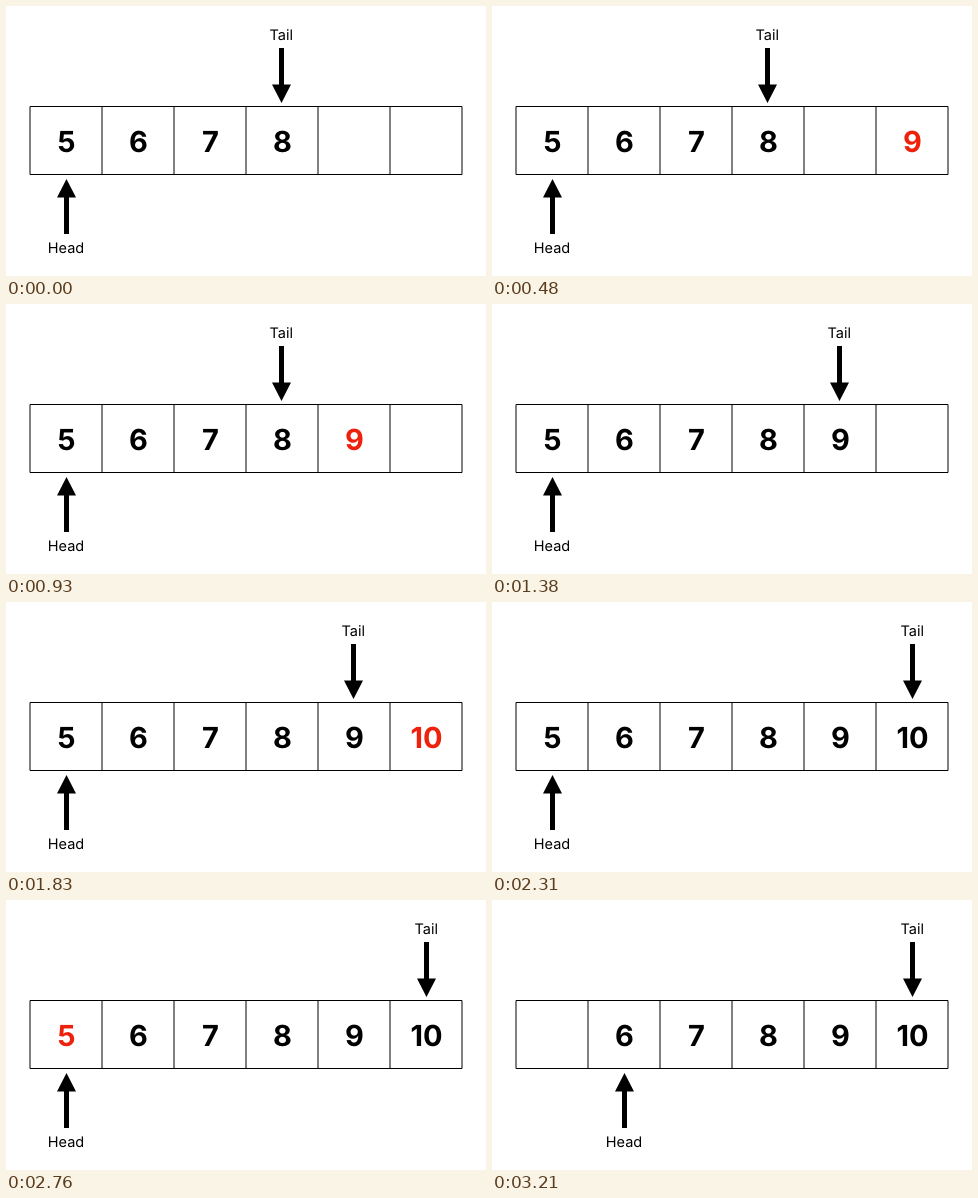
Write an HTML page that moves like this. It is 480x270 px and loops after 3690 ms.

```html
<!DOCTYPE html>
<html lang="en">
<head>
<meta charset="utf-8">
<title>Queue</title>
<style>
  html, body { margin: 0; width: 100%; height: 100%; overflow: hidden; background: #fff; }
  svg { display: block; width: 480px; height: 270px; }
  text { font-family: Inter, "Liberation Sans", sans-serif; text-anchor: middle; text-rendering: geometricPrecision; }
  .digit { font-size: 29px; font-weight: 700; }
  .label { font-size: 14.5px; }
  .grid { fill: none; stroke: #000; stroke-width: 1; }
</style>
</head>
<body>
<svg viewBox="0 0 480 270">
  <path class="grid" d="M24 100.5H456V168.5H24Z M96 100.5v68 M168 100.5v68 M240 100.5v68 M312 100.5v68 M384 100.5v68"/>
  <g id="cells"></g>
  <g id="tail">
    <text class="label" x="-0.3" y="34">Tail</text>
    <path d="M-2.5 42h5v36.5h7L0 97L-9.5 78.5h7Z"/>
  </g>
  <g id="head">
    <path d="M0 173L9.5 191.5h-7V228h-5V191.5h-7Z"/>
    <text class="label" x="-0.5" y="247">Head</text>
  </g>
</svg>
<script>
const LOOP = 3690;
const CELL = 72;
const RED = "#ee220c";
const TAIL_X = { 3: 275.5, 4: 347.5, 5: 420.5 };

// "!" marks a highlighted value
const steps = [
  { at: 0,    cells: "5 6 7 8 _ _",    head: 0, tail: 3 },
  { at: 480,  cells: "5 6 7 8 _ 9!",   head: 0, tail: 3 },
  { at: 930,  cells: "5 6 7 8 9! _",   head: 0, tail: 3 },
  { at: 1380, cells: "5 6 7 8 9 _",    head: 0, tail: 4 },
  { at: 1830, cells: "5 6 7 8 9 10!",  head: 0, tail: 4 },
  { at: 2310, cells: "5 6 7 8 9 10",   head: 0, tail: 5 },
  { at: 2760, cells: "5! 6 7 8 9 10",  head: 0, tail: 5 },
  { at: 3210, cells: "_ 6 7 8 9 10",   head: 1, tail: 5 }
];

const byId = id => document.getElementById(id);
const cellX = i => 60.5 + i * CELL;
const moveTo = (id, x) => byId(id).setAttribute("transform", `translate(${x} 0)`);

const digits = Array.from({ length: 6 }, (_, i) => {
  const text = document.createElementNS("http://www.w3.org/2000/svg", "text");
  text.setAttribute("class", "digit");
  text.setAttribute("x", cellX(i));
  text.setAttribute("y", 145.5);
  return byId("cells").appendChild(text);
});

function show(step) {
  step.cells.split(" ").forEach((value, i) => {
    digits[i].textContent = value.replace(/[_!]/g, "");
    digits[i].setAttribute("fill", value.endsWith("!") ? RED : "#000");
  });
  moveTo("head", cellX(step.head));
  moveTo("tail", TAIL_X[step.tail]);
}

let current = steps[0];
show(current);

const start = performance.now();
function tick() {
  const time = (performance.now() - start) % LOOP;
  const step = steps.filter(s => s.at <= time).pop();
  if (step !== current) show(current = step);
  requestAnimationFrame(tick);
}
requestAnimationFrame(tick);
</script>
</body>
</html>
```
